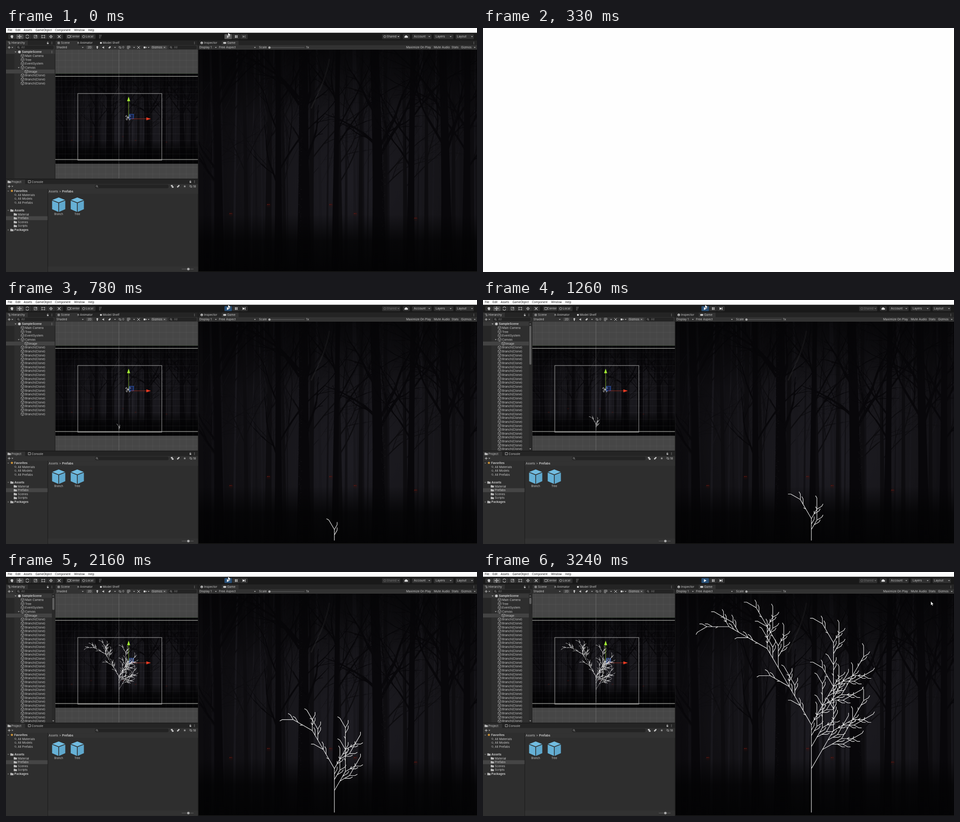
An HTML page with a canvas that plays this animation: 1037 px wide and 540 px high, repeating every 3750 ms.

```html
<!DOCTYPE html>
<html lang="en">
<head>
<meta charset="utf-8">
<title>Growing a plant in the editor</title>
<style>
  html, body { margin: 0; height: 100%; overflow: hidden; background: #191919; }
  canvas { display: block; }
</style>
</head>
<body>
<canvas width="1037" height="540"></canvas>
<script>
const W = 1037, H = 540, LOOP = 3750;
const PANEL = '#2e2e2e', BAR = '#323232', DARK = '#191919', FIELD = '#232323', INK = '#c8c8c8', DIM = '#777';
const screen = document.querySelector('canvas').getContext('2d');
let g = screen;

let seed = 11;
const rnd = (a = 0, b = 1) => {
  seed = (seed * 1664525 + 1013904223) % 4294967296;
  return a + (b - a) * seed / 4294967296;
};

function layer(w, h, draw) {
  const canvas = document.createElement('canvas'), previous = g;
  canvas.width = w;
  canvas.height = h;
  g = canvas.getContext('2d');
  draw();
  g = previous;
  return canvas;
}

// Drawing helpers
function box(x, y, w, h, color) {
  g.fillStyle = color;
  g.fillRect(x, y, w, h);
}
function pill(x, y, w, h, color, r = 1.5) {
  g.fillStyle = color;
  g.beginPath();
  g.roundRect(x, y, w, h, r);
  g.fill();
}
function frame(x, y, w, h, color, width = 1) {
  g.strokeStyle = color;
  g.lineWidth = width;
  g.strokeRect(x, y, w, h);
}
function text(s, x, y, { color = INK, weight = 400, size = 6.5, family = 'Inter', align = 'left' } = {}) {
  g.font = `${weight} ${size}px ${family}, sans-serif`;
  g.textAlign = align;
  g.textBaseline = 'middle';
  g.fillStyle = color;
  g.fillText(s, x, y + .4);
}
function trace(x, y, d, color, width = 1) {
  g.save();
  g.translate(x, y);
  g.strokeStyle = color;
  g.lineWidth = width;
  g.stroke(new Path2D(d));
  g.restore();
}
function shape(x, y, d, color) {
  g.save();
  g.translate(x, y);
  g.fillStyle = color;
  g.fill(new Path2D(d));
  g.restore();
}
function dot(x, y, r, color) {
  g.fillStyle = color;
  g.beginPath();
  g.arc(x, y, r, 0, 7);
  g.fill();
}
function ring(x, y, r, color = INK, width = .8) {
  g.strokeStyle = color;
  g.lineWidth = width;
  g.beginPath();
  g.arc(x, y, r, 0, 7);
  g.stroke();
}
const arrow = (x, y, color = '#aaa') => shape(x, y, 'M-2-1H2L0 1.4Z', color);
const cube = (x, y) => trace(x, y, 'M0-3.8L3.4-2V2L0 3.8L-3.4 2V-2ZM-3.4-2L0 0L3.4-2M0 0V3.8', '#bbb', .7);
const kebab = (x, y) => [-2, 0, 2].forEach(dy => dot(x, y + dy, .6, INK));
const lens = (x, y, color = '#aaa') => {
  ring(x, y - .5, 1.7, color, .7);
  trace(x, y, 'M1.2 .8L2.8 2.4', color, .8);
};
const lock = (x, y) => {
  box(x - 1.7, y - .3, 3.4, 2.7, INK);
  trace(x, y, 'M-1.1 0V-1.4A1.1 1.1 0 0 1 1.1-1.4', INK, .7);
};
const folder = (x, y) => shape(x, y, 'M-3.5-2.5H-.5L.5-1.5H3.5V2.7H-3.5Z', '#b9b9b9');

// Dark forest
const FW = 613, FH = 492;
function limb(x, y, angle, length, width, color) {
  if (length < 9) return;
  const bend = angle + rnd(-.25, .25);
  const mx = x + Math.sin(angle) * length / 2, my = y - Math.cos(angle) * length / 2;
  const ex = mx + Math.sin(bend) * length / 2, ey = my - Math.cos(bend) * length / 2;
  g.strokeStyle = color;
  g.lineWidth = width;
  g.beginPath();
  g.moveTo(x, y);
  g.quadraticCurveTo(mx, my, ex, ey);
  g.stroke();
  limb(ex, ey, bend + rnd(-.2, .2), length * .7, width * .7, color);
  limb(mx, my, angle + rnd(.3, .7) * (rnd() < .5 ? -1 : 1), length * .55, width * .5, color);
}
function trunk(x, width, color, limbs) {
  const lean = rnd(-10, 10);
  g.fillStyle = color;
  g.beginPath();
  g.moveTo(x - width * .7, FH);
  g.quadraticCurveTo(x - width * .4, 300, x + lean - width * .4, 0);
  g.lineTo(x + lean + width * .4, 0);
  g.quadraticCurveTo(x + width * .4, 300, x + width * .7, FH);
  g.fill();
  for (let i = 0; i < limbs; i++)
    limb(x, rnd(90, 310), rnd(.25, .75) * (i % 2 ? -1 : 1), rnd(45, 100), width * .25, color);
}
function shade(gradient, ...stops) {
  stops.forEach(([at, color]) => gradient.addColorStop(at, color));
  g.fillStyle = gradient;
  g.fillRect(0, 0, FW, FH);
}
const forest = layer(FW, FH, () => {
  box(0, 0, FW, FH, '#09080b');
  shade(g.createRadialGradient(340, 300, 20, 340, 290, 360),
    [0, '#1d1c22'], [.55, '#151418'], [1, '#09080b']);
  for (let i = 0; i < 46; i++) trunk(rnd(0, FW), rnd(2, 6), i % 3 ? '#111014' : '#18171c', 1);
  for (let i = 0; i < 13; i++) trunk(i * 50 + rnd(-12, 12), rnd(6, 13), '#0d0c0f', 3);
  [[45, 17], [176, 14], [232, 24], [301, 12], [397, 24], [467, 14], [546, 20], [590, 16]]
    .forEach(([x, width]) => trunk(x, width, '#08070a', 4));
  // Bark glints along the two closest trunks
  for (let y = 0; y < 450; y += 3)
    for (const x of [222, 405]) box(x + rnd(-4, 4), y, rnd(1, 4), 1, `rgba(120,115,120,${rnd(0, .12)})`);
  trace(248, 130, 'M0 0C12-30 32-60 40-110', 'rgba(110,105,110,.17)', 3);
  shade(g.createLinearGradient(0, 0, 0, FH), [0, 'rgba(3,3,4,.6)'], [.3, 'rgba(3,3,4,0)'],
    [.74, 'rgba(3,3,4,0)'], [.86, 'rgba(3,3,4,.8)'], [1, 'rgba(3,3,4,.97)']);
  for (const [x, y] of [[71, 362], [154, 342], [291, 342], [345, 362], [478, 372]]) {
    box(x - 3, y, 2.5, 1.5, '#6e1a14');
    box(x, y, 3, 1.5, '#4e1511');
    dot(x, y + 2, 5, 'rgba(90,15,10,.12)');
  }
});

// X -> F+[[X]-X]-F[-FX]+X, F -> FF
function plant(generation) {
  const path = new Path2D(), TURN = Math.PI / 6;
  const forward = ([x, y, a], d) => {
    const end = [x + Math.sin(a) * d, y - Math.cos(a) * d, a];
    path.moveTo(x, y);
    path.lineTo(end[0], end[1]);
    return end;
  };
  const turn = ([x, y, a], side) => [x, y, a + side * TURN];
  (function grow(pose, n) {
    if (!n) return;
    const d = 2 ** (n - 1), middle = forward(pose, d), top = forward(middle, d);
    grow(turn(middle, 1), n - 1);
    grow(middle, n - 1);
    grow(forward(turn(top, -1), d), n - 1);
    grow(turn(top, 1), n - 1);
  })([0, 0, 0], generation);
  return path;
}
const plants = [0, 1, 2, 3, 4, 5].map(plant);
function drawPlant(n, x, y, sx, sy, width, color, dash = []) {
  g.save();
  g.translate(x, y);
  g.scale(sx, sy);
  g.lineWidth = width / sx;
  g.setLineDash(dash);
  g.strokeStyle = color;
  g.stroke(plants[n]);
  g.restore();
}

// Fixed parts of the editor
function drawToolbar() {
  box(0, 0, W, 10.5, '#fefefe');
  [['File', 4], ['Edit', 21], ['Assets', 39], ['GameObject', 65], ['Component', 108], ['Window', 150], ['Help', 181]]
    .forEach(([s, x]) => text(s, x, 5, { color: '#111', size: 6.2, family: 'Open Sans' }));
  for (let i = 0; i < 7; i++) pill(5 + i * 17.3, 14, 16.6, 10.5, i === 1 ? '#505050' : '#303030');
  shape(13, 19, 'M-3 0L-2-3H2L3-1L2 3.5H-1Z', INK);
  trace(30, 19, 'M-4 0H4M0-4V4M-1-3L0-4L1-3M-1 3L0 4L1 3M-3-1L-4 0L-3 1M3-1L4 0L3 1', '#eee', .8);
  trace(47, 19, 'M-3-1A3 3 0 0 1 3-1M3 1A3 3 0 0 1-3 1', INK);
  frame(62, 16, 6, 6, INK, .8);
  trace(65, 19, 'M-1 1L2-2M0-2H2V0', INK, .8);
  frame(79, 16.5, 6, 5, INK, .7);
  [[79, 16.5], [85, 16.5], [79, 21.5], [85, 21.5]].forEach(([x, y]) => dot(x, y, .9, INK));
  ring(99, 19, 2.6, INK);
  trace(99, 19, 'M-4 0H4M0-4V4', INK, .7);
  trace(117, 19, 'M-3-3L3 3M3-3L-3 3', INK, 1.1);
  pill(132, 14, 31, 10.5, '#303030');
  pill(165, 14, 32, 10.5, '#303030');
  frame(136, 16.5, 5, 5, INK, .8);
  text('Center', 141.5, 19);
  ring(171, 19, 2.5, INK);
  text('Local', 175.5, 19);
  trace(208, 19, 'M-3-3H3M-3 0H1M-3 3H1M-2-4V4M1-4V1', '#777', .7);
  [[828, 40], [874, 15], [894, 43], [942, 43], [990, 40]].forEach(([x, w]) => pill(x, 14, w, 10.5, '#303030'));
  shape(881, 19, 'M-3 2.5A2 2 0 0 1-2.6-1A2.7 2.7 0 0 1 2.5-1A1.8 1.8 0 0 1 3 2.5Z', '#ddd');
  [['Account', 898, 932], ['Layers', 946, 979], ['Layout', 993, 1026]].forEach(([s, x, end]) => {
    text(s, x, 19);
    arrow(end, 19);
  });
}
function drawHierarchyBase() {
  box(0, 27.5, 107.5, 306, PANEL);
  box(0, 27.5, 107.5, 10.5, '#242424');
  box(0, 28, 48, 10, BAR);
  trace(7, 33, 'M-3-2H2M-1 0H3M-1 2H3', INK, .8);
  text('Hierarchy', 12, 33);
  lock(92, 33);
  kebab(101, 33);
  box(0, 38, 107.5, 10, BAR);
  trace(7, 43, 'M-3 0H3M0-3V3', INK);
  arrow(14, 43);
  pill(22, 39, 83, 8, FIELD, 3);
  lens(27, 43);
  text('All', 33.5, 43, { color: DIM });
  box(0, 48.5, 18.5, 285, '#272727');
  box(0, 48.5, 107.5, 8.7, '#383838');
}
function drawSceneBase() {
  box(108.5, 27.5, 314, 10.5, '#242424');
  box(109, 28, 49, 10, BAR);
  trace(116, 33, 'M-3-1H3M-3 1H3M-1-3V3M1-3V3', INK, .7);
  text('Scene', 121, 33);
  trace(159, 33, 'M-2-1L0-2L2-1L0 0ZM-2 1L0 2L2 1', INK, .7);
  text('Animator', 163, 33);
  box(207, 31, 4, 4, INK);
  text('Model Shelf', 213, 33);
  kebab(415, 33);
  box(108.5, 38, 314, 10, BAR);
  text('Shaded', 111, 43);
  [169, 240, 282, 314, 349].forEach(x => arrow(x, 43));
  pill(177, 39, 14, 8, '#444');
  text('2D', 180, 43, { size: 6 });
  dot(201, 42, 2, INK);
  box(200, 44, 2, 2, INK);
  shape(215, 43, 'M-3-1H-1L1-3V3L-1 1H-3Z', INK);
  shape(228, 43, 'M-3 1L1-3L3-1L0 2.5Z', INK);
  trace(251, 43, 'M-3 0Q0-4 3 0Q0 4-3 0M-3-3L3 3', INK, .7);
  text('0', 256, 43);
  trace(270, 43, 'M-3-3H3M-3 0H3M-3 3H1M-3-3V3M0-3V3M3-3V1', INK, .7);
  trace(292, 43, 'M-3-3L3 3M3-3L-3 3', INK);
  shape(306, 43, 'M-3-2H1V2H-3ZM1.5 0L3.5-2V2Z', INK);
  pill(319, 39, 35, 8, '#444');
  text('Gizmos', 321, 43);
  arrow(349, 43);
  pill(358, 39, 62, 8, FIELD, 3);
  lens(363, 43);
  text('All', 370, 43, { color: DIM });

  box(108.5, 48, 314, 285.5, '#464646');
  g.drawImage(forest, 108.5, 101, 314, 199.5);
  g.globalAlpha = .05;
  for (let x = 248.5 - 14.8 * 9; x < 422; x += 14.8) box(x, 48, 1, 285, '#fff');
  for (let y = 219 - 14.8 * 11; y < 333; y += 14.8) box(109, y, 313, 1, '#fff');
  g.globalAlpha = 1;
  box(248, 48, 1, 285, 'rgba(140,140,140,.4)');
  box(108.5, 100.5, 314, .8, '#34452f');
  box(108.5, 300.5, 314, .8, '#555');
  box(108.5, 106.5, 314, 1, '#d5d8cf');
  box(108.5, 290.5, 314, 1, '#d5d8cf');
  frame(158, 145, 185, 147.5, '#a9a9a9');
  trace(269, 198, 'M0 0L-6-2L-4-5ZM0 0L6-3L3-6ZM0 0L-5 3L-3 6ZM0 0L5 3L3 6Z', '#ddd', .8);
  box(272, 191, 9, 10, 'rgba(30,60,160,.35)');
  frame(272, 191, 9, 10, '#2d5fc4');
  trace(270, 201, 'M0-5V-40', '#7ba92a');
  shape(270, 152, 'M0 0L3.4 10H-3.4Z', '#a3ef33');
  trace(276, 201, 'M0 0H33', '#9c3024');
  shape(319, 201, 'M0 0L-10-3.3V3.3Z', '#ea3b23');
}
function drawProjectBase() {
  box(0, 335, 422.5, 205, PANEL);
  box(0, 335, 422.5, 10.5, '#242424');
  box(0, 335.5, 42, 10, BAR);
  folder(7, 340.5);
  text('Project', 12, 340.5);
  frame(49, 337.7, 5, 5, INK, .8);
  text('Console', 56.5, 340.5);
  lock(406, 340);
  kebab(415, 340);
  box(0, 345.5, 422.5, 10.5, BAR);
  trace(7, 350.5, 'M-3 0H3M0-3V3', INK);
  arrow(14, 350.5);
  pill(196, 346.5, 162, 8, FIELD, 3);
  lens(200, 350.5);
  shape(366, 350.5, 'M-3-3H1V0H3V3H-1V0H-3Z', INK);
  shape(379, 350.5, 'M-3 1L1-3H3V-1L-1 3Z', INK);
  star(393.5, 350.5, 3, '#999');
  trace(407, 350.5, 'M-3 0Q0-4 3 0Q0 4-3 0M-3-3L3 3', INK, .7);
  text('18', 411.5, 350.5);
  box(91.5, 356, 1, 184, DARK);
  box(92.5, 356.5, 330, 10.5, BAR);
  text('Assets', 94, 361.7);
  text('>', 117, 361.7);
  text('Prefabs', 123.5, 361.7, { weight: 700 });

  box(0, 416.6, 91.5, 8.6, '#454545');
  arrow(5, 361, DIM);
  star(13, 360.5, 3.5, '#e0a03a');
  text('Favorites', 18, 361, { weight: 700 });
  ['Materials', 'Models', 'Prefabs'].forEach((s, i) => {
    lens(20.5, 369.5 + i * 8.6);
    text('All ' + s, 26, 369.5 + i * 8.6);
  });
  arrow(5, 403.7, DIM);
  folder(13, 403.7);
  text('Assets', 18.5, 403.7, { weight: 700 });
  ['Material', 'Prefabs', 'Scenes', 'Scripts'].forEach((s, i) => {
    folder(20.5, 412.3 + i * 8.6);
    text(s, 26, 412.3 + i * 8.6);
  });
  shape(5, 447, 'M-1-2L1.4 0L-1 2Z', DIM);
  folder(13, 447);
  text('Packages', 18.5, 447, { weight: 700 });

  [['Branch', 116], ['Tree', 157]].forEach(([s, x]) => {
    shape(x, 391, 'M0-16L14-10.5L0-5L-14-10.5Z', '#72bce0');
    shape(x, 391, 'M-14.5-9L-.8-3.6V16L-14.5 10Z', '#66b1d6');
    shape(x, 391, 'M14.5-9L.8-3.6V16L14.5 10Z', '#5fa8cd');
    text(s, x, 412.3, { size: 5.8, align: 'center' });
  });
  box(92.5, 528, 330, 10.5, BAR);
  box(387, 533, 26, 1, '#606060');
  dot(401.5, 533.5, 2.7, '#aaa');
}
function star(x, y, r, color) {
  g.fillStyle = color;
  g.beginPath();
  for (let i = 0; i < 10; i++) {
    const a = i * Math.PI / 5, d = i % 2 ? r * .45 : r;
    g.lineTo(x + Math.sin(a) * d, y - Math.cos(a) * d);
  }
  g.fill();
}
function drawGameBase() {
  box(424, 27.5, 613, 10.5, '#242424');
  box(475, 28, 37, 10, BAR);
  dot(431, 33, 2.7, INK);
  box(430.6, 32, .9, 3, '#242424');
  text('Inspector', 436, 33);
  pill(478, 31, 7, 4, INK, 2);
  text('Game', 487, 33);
  kebab(1030, 33);
  box(424, 38, 613, 10, BAR);
  [['Display 1', 426], ['Free Aspect', 469], ['Scale', 557], ['1x', 661], ['Maximize On Play', 881],
    ['Mute Audio', 942], ['Stats', 981], ['Gizmos', 1002]].forEach(([s, x]) => text(s, x, 43));
  [462, 548, 1032].forEach(x => arrow(x, 43));
  box(580, 42.7, 77, 1, '#606060');
  dot(580, 43.2, 2.5, '#aaa');
  g.drawImage(forest, 424, 48);
  box(424, 538.5, 613, 1.5, DARK);
}
const editor = layer(W, H, () => {
  box(0, 0, W, H, DARK);
  drawToolbar();
  drawHierarchyBase();
  drawSceneBase();
  drawProjectBase();
  drawGameBase();
});

// Changing parts
function drawHierarchy(n) {
  const row = i => 53 + i * 8.66;
  const clones = [3, 3, 18, 84, 360, 1488][n];
  g.save();
  g.beginPath();
  g.rect(0, 48, 107.5, 285.5);
  g.clip();
  box(0, row(5) - 4.3, 107.5, 8.6, '#434343');
  arrow(21, row(0));
  dot(29.5, row(0), 3, INK);
  text('SampleScene', 35, row(0), { weight: 700 });
  ['Main Camera', 'Tree', 'EventSystem', 'Canvas'].forEach((s, i) => {
    cube(36.5, row(i + 1));
    text(s, 42, row(i + 1));
  });
  arrow(28, row(4));
  cube(45, row(5));
  text('Image', 50, row(5));
  for (let i = 0; i < Math.min(clones, 27); i++) {
    cube(36.5, row(i + 6));
    text('Branch(Clone)', 42, row(i + 6));
  }
  if (n > 2) {
    box(101, 48.5, 6.5, 285, '#292929');
    shape(104, 53, 'M-2 1H2L0-1.4Z', DIM);
    arrow(104, 329.5);
    pill(102, 57, 4.5, [86, 27, 14][n - 3], '#5e5e5e', 2);
  } else kebab(101, row(0));
  g.restore();
}
function drawPlayControls(playing) {
  pill(481, 13.5, 16.5, 11, playing ? '#285078' : '#5a5a5a');
  pill(498.3, 13.5, 16.5, 11, '#303030');
  pill(515.6, 13.5, 16.5, 11, '#303030');
  shape(489, 19, 'M-2.5-3.2L3 0L-2.5 3.2Z', playing ? '#fff' : INK);
  box(504.5, 16, 1.6, 6, '#eee');
  box(507.7, 16, 1.6, 6, '#eee');
  shape(524, 19, 'M-3-3L1.5 0L-3 3ZM1.8-3H3V3H1.8Z', playing ? '#eee' : '#808080');
  const color = playing ? '#707070' : INK;
  ring(834, 19, 2.3, color);
  text('Shared', 838, 19, { color });
  arrow(864, 19, color);
}
function pointerAt(t) {
  if (t < 2400) return [489, 10];
  if (t < 2490) {
    const k = (t - 2400) / 90;
    return [489 + 22 * k, 10 - 5 * k];
  }
  if (t < 2700) return null;
  const k = 1 - (1 - Math.min(1, (t - 2700) / 540)) ** 2;
  return [878 + 108 * k, 1 + 64 * k];
}
const since = (t, times) => times.filter(at => t >= at).length;

function render(t) {
  if (t >= 330 && t < 360) return box(0, 0, W, H, '#fefefe');
  const sceneStage = since(t, [150, 750, 1170, 1680, 2160]);
  const gameStage = since(t, [150, 780, 1260, 1800, 2190]);
  g.drawImage(editor, 0, 0);
  drawHierarchy(gameStage);
  drawPlayControls(t >= 30);
  drawPlant(sceneStage, 248.8, 288.5, 1.84, 1.79, .8, 'rgba(235,235,235,.9)', [1.3, .7]);
  drawPlant(gameStage, 723, 532.3, 6.074, 6.074, 1.15, '#eee');
  const pointer = pointerAt(t);
  if (pointer) {
    const d = 'M0 0V8.6L2 6.8L3.4 9.8L4.7 9.2L3.4 6.3H6Z';
    shape(...pointer, d, '#fff');
    trace(...pointer, d, '#222', .5);
  }
}

const start = performance.now();
(function tick() {
  render((performance.now() - start) % LOOP);
  requestAnimationFrame(tick);
})();
</script>
</body>
</html>
```
